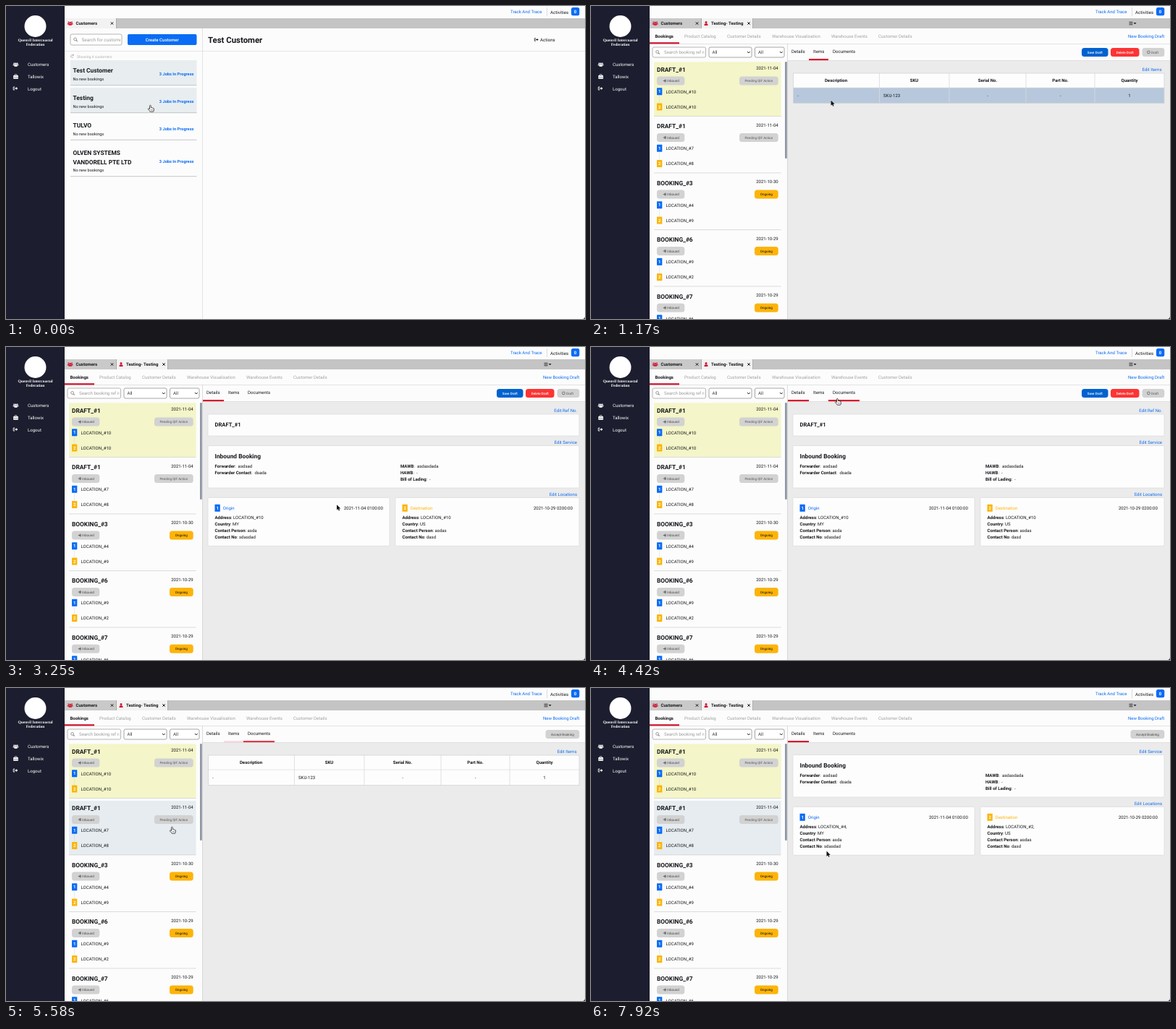
These frames come from a looping animation (800x433 px, 8 s). An HTML page with a canvas:

```html
<!DOCTYPE html>
<html lang="en">
<head>
<meta charset="utf-8">
<title>Bookings</title>
<style>
html, body { margin: 0; width: 100%; height: 100%; overflow: hidden; background: #fcfcfc; }
canvas { display: block; width: 800px; height: 433px; }
</style>
</head>
<body>
<canvas id="stage"></canvas>
<script>
const W = 800, H = 433, LOOP = 8000, STEP = 1000 / 12;
const canvas = document.getElementById('stage');
const ctx = canvas.getContext('2d');
const dpr = window.devicePixelRatio || 1;
canvas.width = W * dpr;
canvas.height = H * dpr;

const BLUE = '#0a6cf5', RED = '#cf1530', AMBER = '#fbb508', INK = '#16181c';
const PALE = '#fcfcfc', GREY = '#d2d2d2', MUTED = '#a2a2a2', EDGE = '#d9dadc';

// Moments at which the app reacts to a click
const OPEN = 250, PICK = 500, ITEMS = 880, DETAILS = 2420, DOCS = 4490, PICK2 = 5570, DETAILS2 = 6910;

const bookings = [
  ['DRAFT_#1', '2021-11-04', 10, 10],
  ['DRAFT_#1', '2021-11-04', 7, 8],
  ['BOOKING_#3', '2021-10-30', 4, 9],
  ['BOOKING_#6', '2021-10-29', 9, 2],
  ['BOOKING_#7', '2021-10-29', 6, 3]
];

// time, x, y of the pointer tip
const path = [
  [0, 199.5, 137.5], [250, 198, 136], [500, 178, 112], [830, 314, 65], [920, 316, 67],
  [1170, 331.5, 130.5], [1650, 334, 128], [1900, 345, 122], [2330, 287, 63.5], [2500, 287, 65],
  [2950, 420, 170], [3400, 470, 235], [3900, 400, 180], [4330, 345, 72], [4420, 340.5, 71.5],
  [4580, 341, 70], [5000, 310, 165], [5340, 231, 193], [5580, 229.5, 192.5], [6000, 360, 135],
  [6350, 420, 126], [6750, 310, 70], [7000, 289, 71.5], [7160, 289, 72], [7520, 335, 335],
  [7750, 328, 245], [7920, 325.5, 225.5], [8000, 325.5, 225.5]
];

const tabs = [
  ['Details', 272, 301, 277, [[500, 0], [560, 1], [880, 1], [1000, 0], [2250, 0], [2330, .4], [2420, 1],
    [4490, 1], [4650, 0], [6820, 0], [6950, 1]]],
  ['Items', 301, 328, 307, [[780, 0], [880, 1], [2420, 1], [2600, 0], [5560, 0], [5580, .12], [5750, 1],
    [6910, 1], [7000, .55], [7120, 0]]],
  ['Documents', 328, 371, 334, [[4300, 0], [4410, 1], [5560, 1], [5580, .85], [5750, 0]]]
];

const smooth = k => k * k * (3 - 2 * k);

// Values of a keyframe list at time t
function sample(keys, t, ease = k => k) {
  if (t <= keys[0][0]) return keys[0].slice(1);
  for (let i = 1; i < keys.length; i++) {
    const a = keys[i - 1], b = keys[i];
    if (t <= b[0]) {
      const k = ease((t - a[0]) / (b[0] - a[0]));
      return a.slice(1).map((v, j) => v + (b[j + 1] - v) * k);
    }
  }
  return keys[keys.length - 1].slice(1);
}

// y is the middle of the capitals
function text(s, x, y, size = 6.05, color = INK, weight = 400, align = 'left', family = 'Roboto, sans-serif') {
  ctx.font = `${weight} ${size}px ${family}`;
  ctx.textAlign = align;
  ctx.fillStyle = color;
  ctx.fillText(s, x, y + size * .355);
  return ctx.measureText(s).width;
}

function rect(x, y, x2, y2, color) {
  ctx.fillStyle = color;
  ctx.fillRect(x, y, x2 - x, y2 - y);
}

function box(x, y, x2, y2, r, fill, stroke, width = .6) {
  ctx.beginPath();
  ctx.roundRect(x, y, x2 - x, y2 - y, r);
  if (fill) { ctx.fillStyle = fill; ctx.fill(); }
  if (stroke) { ctx.strokeStyle = stroke; ctx.lineWidth = width; ctx.stroke(); }
}

function dot(x, y, r, color) {
  ctx.fillStyle = color;
  ctx.beginPath();
  ctx.arc(x, y, r, 0, 7);
  ctx.fill();
}

function line(points, color, width = .8) {
  ctx.strokeStyle = color;
  ctx.lineWidth = width;
  ctx.beginPath();
  points.forEach(([x, y]) => ctx.lineTo(x, y));
  ctx.stroke();
}

function button(s, x, y, x2, y2, fill, color, weight = 400, size = 4.55) {
  box(x, y, x2, y2, 3.5, fill);
  text(s, (x + x2) / 2, (y + y2) / 2, size, color, weight, 'center');
}

function person(x, y, color, k = 1) {
  dot(x, y - 1.6 * k, 1.5 * k, color);
  box(x - 2.5 * k, y + .3 * k, x + 2.5 * k, y + 3 * k, [1.8 * k, 1.8 * k, 0, 0], color);
}

function people(x, y, color) {
  person(x - 2.3, y - .4, color, .65);
  person(x + 2.3, y - .4, color, .65);
  person(x, y + .3, color, .85);
}

function doorArrow(x, y, color, k = 1, into = false) {
  const d = into ? -1 : 1;
  line([[x - d * k, y - 2 * k], [x - d * 3 * k, y - 2 * k], [x - d * 3 * k, y + 2 * k], [x - d * k, y + 2 * k]], color, .9 * k);
  line([[x - 1.6 * k, y], [x + 2 * k, y]], color, 1.2 * k);
  ctx.fillStyle = color;
  ctx.beginPath();
  ctx.moveTo(x + .8 * k, y - 2 * k);
  ctx.lineTo(x + 3 * k, y);
  ctx.lineTo(x + .8 * k, y + 2 * k);
  ctx.fill();
}

function search(s, x, y, x2, y2, textX, size) {
  const cy = (y + y2) / 2;
  box(x, y, x2, y2, 2, '#fff', '#a3a3a3', .8);
  ctx.strokeStyle = '#8a8a8a';
  ctx.lineWidth = .9;
  ctx.beginPath();
  ctx.arc(x + 6.6, cy - .6, 1.9, 0, 7);
  ctx.stroke();
  line([[x + 8, cy + .8], [x + 9.7, cy + 2.5]], '#8a8a8a', 1.1);
  ctx.save();
  ctx.beginPath();
  ctx.rect(x, y, x2 - x - 2, y2 - y);
  ctx.clip();
  text(s, textX, cy, size, '#9b9b9b');
  ctx.restore();
}

function select(x, x2) {
  box(x, 57, x2, 71, 2, '#fff', '#909090', .8);
  text('All', x + 4.5, 64.3, 6.05, '#333');
  line([[x2 - 6, 63], [x2 - 4.2, 65], [x2 - 2.4, 63]], '#222', 1);
}

function cross(x, y) {
  line([[x - 1.7, y - 1.7], [x + 1.7, y + 1.7]], '#111', 1);
  line([[x - 1.7, y + 1.7], [x + 1.7, y - 1.7]], '#111', 1);
}

function sidebar() {
  rect(0, 0, 81, H, '#1c1d2e');
  dot(40.5, 28, 15, '#fff');
  text('Quenvil Intercoastal', 40.5, 47.5, 5.5, '#fff', 700, 'center', '"Liberation Serif", serif');
  text('Federation', 40.5, 53.5, 5.5, '#fff', 700, 'center', '"Liberation Serif", serif');
  people(13.5, 80.8, '#fff');
  box(10, 96, 17, 100.8, 1, '#fff');
  box(11.8, 94.8, 15.2, 97, .7, null, '#fff', .8);
  line([[10, 98.4], [17, 98.4]], '#1c1d2e', .5);
  doorArrow(13.2, 114, '#fff');
  ['Customers', 'Tallowix', 'Logout'].forEach((s, i) => text(s, 30, 81.2 + i * 16.6, 6.05, '#fff'));
}

function header(open) {
  text('Track And Trace', 697, 7.5, 6.05, BLUE);
  rect(747, 2, 747.7, 14, '#d0d0d0');
  text('Activities', 752, 8.5, 6.15);
  box(781, 2, 792.3, 13.2, 2.5, BLUE);
  text('0', 786.6, 7.6, 6.05, '#fff', 700, 'center');
  rect(81, 17, W, 31, '#c4c4c4');
  rect(81, 17, 152, 31, open ? '#c9c9c9' : '#f2f2f2');
  rect(152, 17, 153, 31, '#aaa');
  people(88.7, 24, RED);
  text('Customers', 96.5, 24.2, 6.05, INK, 700);
  cross(146.5, 24);
  if (!open) return;
  rect(153, 17, 223, 31, '#f2f2f2');
  rect(223, 17, 223.8, 31, '#aaa');
  person(159, 24, RED);
  text('Testing- Testing', 166, 24.2, 6.05, INK, 700);
  cross(218, 24);
  for (let i = -1; i < 2; i++) line([[743.5, 24 + i * 1.8], [748.5, 24 + i * 1.8]], '#222', .8);
  ctx.fillStyle = '#222';
  ctx.beginPath();
  ctx.moveTo(749.6, 23);
  ctx.lineTo(753.6, 23);
  ctx.lineTo(751.6, 25.3);
  ctx.fill();
}

function customerPage() {
  rect(81, 62, W, 62.7, '#dedede');
  rect(271, 31, 271.8, H, '#dcdcdc');
  search('Search for customers', 89, 39, 160, 54, 104.5, 6.4);
  box(168, 39, 263.5, 54, 2, BLUE);
  text('Create Customer', 215.7, 46.7, 6.1, '#fff', 500, 'center');
  text('Test Customer', 279, 46.8, 11.4, INK, 700);
  doorArrow(733, 46.5, '#222', .9);
  text('Actions', 738, 46.8, 6.15);
  ctx.strokeStyle = '#a5a5a5';
  ctx.lineWidth = .8;
  ctx.beginPath();
  ctx.arc(91.3, 69.5, 1.8, .5, 5.6);
  ctx.stroke();
  rect(92, 67, 93.6, 68.6, '#a5a5a5');
  text('Showing 4 customers', 98, 69.8, 5.05, '#b0b0b0');
  const rows = [
    [75, 110, ['Test Customer']], [113, 148, ['Testing']], [151, 185.5, ['TULVO']],
    [189, 236, ['OLVEN SYSTEMS', 'VANDORELL PTE LTD']]
  ];
  rows.forEach(([y, y2, names], i) => {
    if (i < 2) rect(89, y, 263.5, y2, '#e8edf0');
    rect(89, y2 - .8, 263.5, y2 + .2, '#c3c5c8');
    names.forEach((s, j) => text(s, 92.5, y + 14.2 + j * 12.4, 8.4, INK, 700));
    const extra = (names.length - 1) * 12.4;
    text('No new bookings', 92.5, y + 26 + extra, 5.55);
    text('3 Jobs In Progress', 259.5, y + 19.3 + extra / 2, 5.67, BLUE, 700, 'right');
  });
}

function place(n, x, y) {
  box(x, y - 5, x + 7.3, y + 5, .6, n === 1 ? BLUE : AMBER);
  text(n, x + 3.65, y, 6, '#fff', 700, 'center');
}

function bookingRow([title, date, from, to], i, fill) {
  const y = 77.5 + i * 78.5;
  if (fill) rect(87, y, 262.5, y + 75, fill);
  rect(87, y + 74.5, 262.5, y + 75.3, '#d3d4d5');
  text(title, 91, y + 10.2, 8.35, INK, 700);
  text(date, 258.7, y + 8.7, 6.05, INK, 400, 'right');
  box(91, y + 20, 129.3, y + 32, 3.5, GREY);
  doorArrow(101, y + 26, '#555', .75, true);
  text('Inbound', 105.3, y + 26.1, 4.55, '#444');
  if (i < 2) button('Pending QIF Action', 205, y + 20, 258.7, y + 32, GREY, '#555');
  else button('Ongoing', 226, y + 20, 258.7, y + 32, '#fdb409', '#3b2a00', 500);
  for (let d = 47; d < 56; d += 2) rect(94.4, y + d, 95, y + d + 1, '#c4c4c4');
  place(1, 91, y + 40.7);
  place(2, 91, y + 62);
  text('LOCATION_#' + from, 103.5, y + 41.3);
  text('LOCATION_#' + to, 103.5, y + 62.3);
}

function bookingList(t, hover2) {
  bookings.forEach((b, i) => {
    const fill = i === 0 && t >= PICK ? '#f4f5c8' : i === 1 && hover2 ? '#e6ecf0' : null;
    bookingRow(b, i, fill);
  });
  box(268, 77, 270.8, 211, 1.2, '#8f96a6');
}

function table(hover) {
  text('Edit Items', 788.5, 88, 6.05, BLUE, 400, 'right');
  rect(279.5, 93, 792, 134.5, '#fdfdfd');
  if (hover) rect(279.5, 113, 792, 134.5, '#b8c8dc');
  [398.5, 495, 601, 696].forEach(x => rect(x - .4, 93, x + .4, 134.5, EDGE));
  rect(279.5, 112.7, 792, 113.4, EDGE);
  box(279.5, 93, 792, 134.5, 0, null, '#d2d4d7', .8);
  const heads = [['Description', 338.5], ['SKU', 446.5], ['Serial No.', 548], ['Part No.', 648.5], ['Quantity', 744]];
  heads.forEach(([s, x]) => text(s, x, 103.2, 6.05, INK, 700, 'center'));
  text('-', 285, 124.2);
  text('SKU-123', 404, 124.2);
  text('-', 548, 124.2, 6.05, INK, 400, 'center');
  text('-', 648.5, 124.2, 6.05, INK, 400, 'center');
  text('1', 744, 124.2, 6.05, INK, 400, 'center');
}

const card = (x, y, x2, y2) => box(x, y, x2, y2, 1.2, '#fdfdfd', EDGE, .7);
const link = (s, y) => text(s, 789, y, 6.05, BLUE, 400, 'right');

function field(name, value, x, y) {
  const w = text(name, x, y, 6.05, INK, 700);
  text(': ' + value, x + w, y);
}

function locationCard(n, x, x2, y, date, values) {
  card(x, y, x2, y + 67);
  place(n, x + 9.5, y + 14.5);
  text(n === 1 ? 'Origin' : 'Destination', x + 20.7, y + 14.5, 6.05, n === 1 ? BLUE : AMBER);
  text(date, x2 - 9.2, y + 14.5, 6.05, INK, 400, 'right');
  ['Address', 'Country', 'Contact Person', 'Contact No'].forEach((s, i) => field(s, values[i], x + 9.5, y + 27.4 + i * 9.1));
}

function details(second) {
  const dy = second ? -44 : 0;
  if (!second) {
    link('Edit Ref No.', 88);
    card(279, 93, 792, 123);
    text('DRAFT_#1', 288.5, 107, 7.6, INK, 700);
  }
  link('Edit Service', 131.8 + dy);
  card(279, 136.5 + dy, 792, 195 + dy);
  text('Inbound Booking', 288.5, 151 + dy, 8.35, INK, 700);
  const rows = [['Forwarder', ' asdsad', 288.5, 0], ['Forwarder Contact', ' dsada', 288.5, 1],
    ['MAWB', ' asdasdada', 545, 0], ['HAWB', ' -', 545, 1], ['Bill of Lading', ' -', 545, 2]];
  rows.forEach(([s, v, x, i]) => field(s, v, x, 164.6 + dy + i * 9.1));
  link('Edit Locations', 203.6 + dy);
  const [from, to] = second ? ['LOCATION_#4,', 'LOCATION_#2,'] : ['LOCATION_#10', 'LOCATION_#10'];
  locationCard(1, 279, 530, 208.3 + dy, '2021-11-04 0100:00', [from, 'MY', 'asda', 'sdasdad']);
  locationCard(2, 538, 792, 208.3 + dy, '2021-10-29 0200:00', [to, 'US', 'asdas', 'dasd']);
}

function bookingPane(t, px, py) {
  tabs.forEach(([name, x, x2, textX, keys]) => {
    text(name, textX, 63.3, 6.1);
    ctx.globalAlpha = sample(keys, t)[0];
    rect(x, 73, x2, 75.2, '#d8152c');
    ctx.globalAlpha = 1;
  });
  if (t < PICK2) {
    button('Save Draft', 678, 58, 714.5, 70, '#0062cf', '#fff', 500);
    button('Delete Draft', 718, 58, 757.5, 70, '#fc3434', '#fff', 500);
    box(761.5, 58, 792.3, 70, 3.5, GREY);
    box(768.7, 62.2, 772, 65.6, .8, null, '#555', .7);
    text('Draft', 774, 64, 4.55, '#555');
  } else {
    button('Accept Booking', 745.5, 58, 792.3, 70, GREY, '#444');
  }
  if (t < ITEMS) details(false);
  else if (t < DETAILS) table(px > 279 && py > 113 && py < 134);
  else if (t < DOCS) details(false);
  else if (t >= DETAILS2) details(true);
  else if (t >= PICK2) table(px > 279 && py > 113 && py < 134);
}

function bookingPage(t, px, py) {
  rect(271, 75, W, H, '#ebebeb');
  rect(81, 52, W, 52.7, '#d8d8d8');
  rect(271, 75, W, 75.6, '#d8d8d8');
  text('Bookings', 88.5, 41.8, 6.05, INK, 700);
  const nav = [['Product Catalog', 129], ['Customer Details', 188], ['Warehouse Visualisation', 250],
    ['Warehouse Events', 332], ['Customer Details', 397]];
  nav.forEach(([s, x]) => text(s, x, 41.8, 6.1, MUTED));
  rect(81, 50.2, 122, 52.4, RED);
  text('New Booking Draft', 792.3, 42, 6.05, BLUE, 400, 'right');
  search('Search booking ref no.', 85, 57, 158.5, 71, 101, 6.15);
  select(163, 222);
  select(226.5, 267);
  const over = px > 87 && px < 262 && py > 156 && py < 231;
  bookingList(t, t >= PICK2 || over);
  rect(271, 52, 271.7, H, '#d0d0d0');
  if (t >= PICK) bookingPane(t, px, py);
}

function pointer(x, y, hand) {
  ctx.save();
  ctx.translate(x, y);
  ctx.lineJoin = 'round';
  const shape = new Path2D(hand
    ? 'M-1 .7Q-.9-.3 0-.2Q.8-.1.8.8V3.2L1.6 3Q2.4 2.9 2.6 3.5Q3.5 3.1 3.8 3.9Q4.9 3.7 4.9 4.9V6.2Q4.8 7.4 4 8.7H-.3Q-1.2 7.2-2.8 5.6Q-3.5 4.7-2.7 4.3Q-2 4-1 5.2Z'
    : 'M0 0V7.4L1.7 5.9L2.8 8.3L4.1 7.7L3 5.4H5.3Z');
  ctx.fillStyle = hand ? '#fff' : '#111';
  ctx.strokeStyle = hand ? '#222' : '#fff';
  ctx.lineWidth = hand ? .8 : 1;
  if (!hand) ctx.stroke(shape);
  ctx.fill(shape);
  if (hand) {
    ctx.stroke(shape);
    [.8, 2.2, 3.5].forEach(dx => line([[dx, 5.2], [dx, 7.2]], '#444', .5));
  }
  ctx.restore();
}

function draw(t) {
  const [x, y] = sample(path, t, smooth);
  const open = t >= OPEN;
  ctx.setTransform(dpr, 0, 0, dpr, 0, 0);
  ctx.textBaseline = 'alphabetic';
  ctx.textRendering = 'geometricPrecision';
  rect(0, 0, W, H, PALE);
  header(open);
  if (open) bookingPage(t, x, y);
  else customerPage();
  sidebar();
  ctx.fillStyle = '#333';
  ctx.beginPath();
  ctx.moveTo(W, 429.5);
  ctx.quadraticCurveTo(W - .3, H - .3, 796.5, H);
  ctx.lineTo(W, H);
  ctx.fill();
  const onTab = open && x > 272 && x < 371 && y > 54 && y < 75;
  const onRow = x > 87 && x < 263 && y > 75;
  pointer(x, y, onTab || onRow);
}

function frame(now) {
  const t = now % LOOP;
  draw(Math.floor((t + 5) / STEP) * STEP % LOOP);
  requestAnimationFrame(frame);
}
requestAnimationFrame(frame);
</script>
</body>
</html>
```
